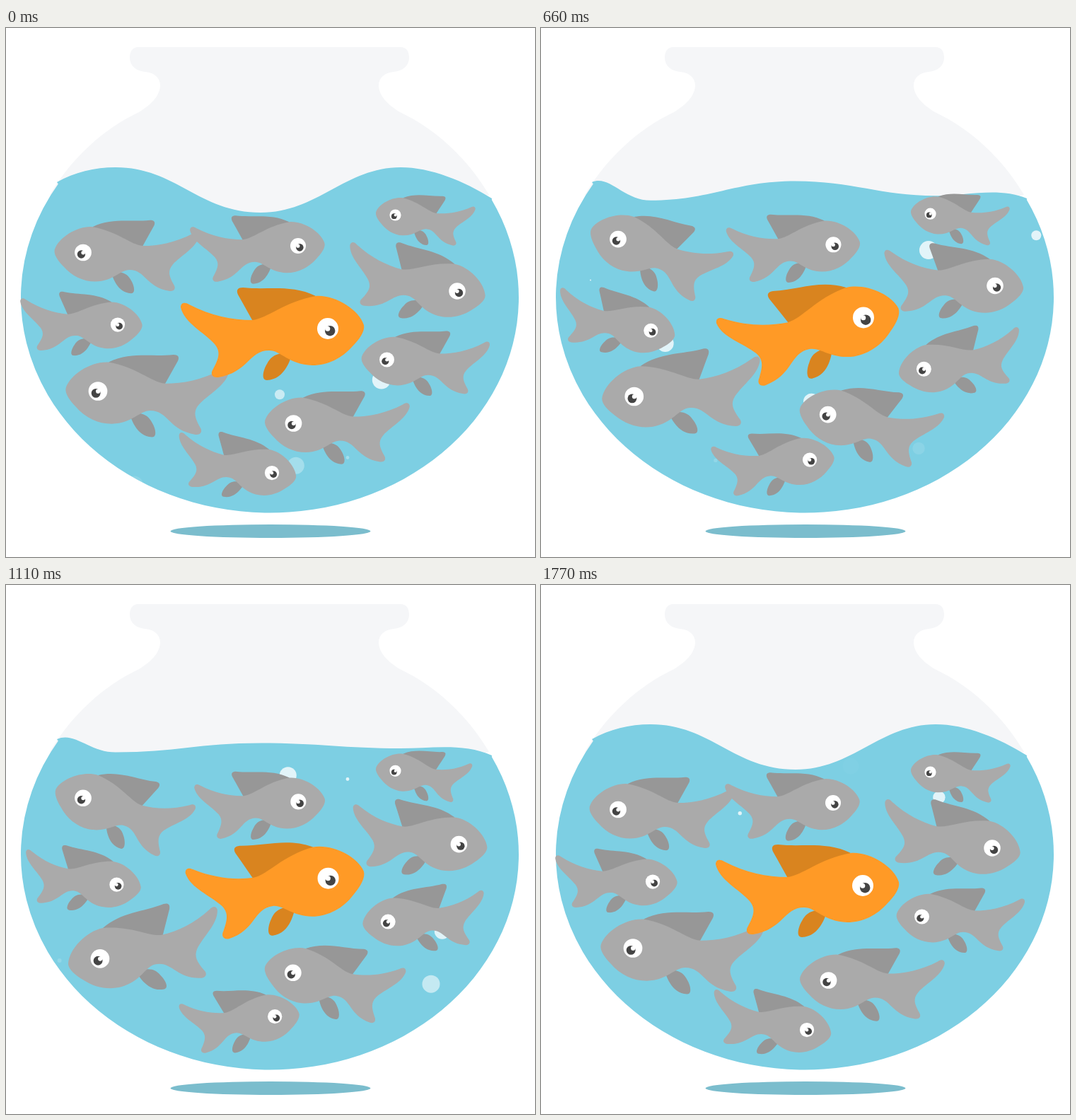
Recreate the animation shown at these times as an HTML page with a canvas. Size 748 px wide and 748 px high, loop 1.8 s.

```html
<!DOCTYPE html>
<html lang="en">
<head>
<meta charset="utf-8">
<title>Fish bowl</title>
<style>
html, body { margin: 0; width: 100%; height: 100%; overflow: hidden; background: #fff; }
canvas { display: block; width: 748px; height: 748px; }
</style>
</head>
<body>
<canvas id="stage" width="748" height="748"></canvas>
<script>
const ctx = document.getElementById('stage').getContext('2d');
const LOOP = 1800, STEP = 30, SWIM = 1770, TURN = 810;

const clamp = v => Math.min(1, Math.max(0, v));
const mix = (a, b, k) => a + (b - a) * k;
const ramp = (t, peak) => t < peak ? t / peak : (SWIM - t) / (SWIM - peak);

// Fish outlines: right-facing, eye at the origin; start point, then cubic segments.
const BODY = [-208, -30,
  -208, -37, -202, -38, -196, -34, -165, -18, -135, -12, -107, -12,
  -85, -14, -62, -38, -17, -46, 10, -48, 44, -27, 51, -5,
  53, 4, 44, 16, 35, 25, 20, 42, 0, 52, -22, 52,
  -55, 51, -66, 31, -83, 31, -112, 31, -112, 62, -155, 69,
  -163, 70, -167, 64, -162, 57, -154, 42, -151, 33, -160, 22,
  -175, 5, -203, -8, -208, -30];
const DORSAL = [-98, 4,
  -108, -14, -118, -32, -127, -48, -130, -55, -127, -58, -120, -58,
  -85, -54, -52, -63, -17, -46];
const VENTRAL = [-50, 34,
  -52, 41, -60, 72, -86, 73, -95, 73, -91, 58, -86, 50, -82, 42, -76, 36, -64, 35];

// Size (negative faces left), x, y, drift x, drift y, tilt, swing, time of the far point.
const school = [
  [-.79, 109, 317.5, 0, -20, 0, -19, 810],
  [.735, 413, 308, .5, 1, 0, 0, 810],
  [-.54, 550.5, 264.5, 0, 0, -4, 0, 810],
  [.785, 638, 372, 4.5, -5.5, 15, -6.5, 520],
  [.675, 158, 419.5, -3.5, 14, 5.4, 15, 300],
  [-.7, 538.5, 469, 3, 16.5, 0, 16, 600],
  [-.89, 130, 513.5, 3, 18, 0, 15.2, 1130],
  [-.79, 406.5, 559, -1, -12, 0, -10.5, 810],
  [.675, 376, 629, 5.5, -22, 14, -21, 900],
  [1, 455, 425, 1, -12.8, 0, -10, 600]
];

// Radius, birth time, x, y, then sideways and upward speed per second.
const bubbles = [
  [12, -45, 182, 659, -9, 302],
  [7, -230, 387, 585, 0, 290],
  [13, -300, 523, 581, 26, 278],
  [12, -115, 411, 655, -10, 315],
  [2.4, -115, 483, 642, 0, 300],
  [13.5, 0, 637, 629, -20, 385],
  [7, 0, 697, 523, 5, 348],
  [8.5, 290, 387, 727, -85, 363],
  [11.5, 330, 366, 609, 50, 245],
  [1, 100, 70, 533, 0, 315],
  [2.7, 600, 245, 627, 31, 260],
  [8.7, 620, 533, 605, 26, 265],
  [11, 820, 629, 607, -42, 404],
  [12.5, 900, 601, 623, 0, 280],
  [3, 1050, 75, 549, 10, 300]
];

// Swimming strokes shared by the school.
const KEYS = [0, 270, 480, TURN, 1110, 1350, SWIM];
const BOB = [0, .65, .92, 0, .37, 1];
const REACH = [1, .955, .97, 1, .96, .972];

// Smooth cyclic curve through the key values, without overshoot.
function curve(vals, t) {
  const n = vals.length;
  let i = 0;
  while (i < n - 1 && t >= KEYS[i + 1]) i++;
  const span = j => KEYS[(j + n) % n + 1] - KEYS[(j + n) % n];
  const slope = j => (vals[(j + 1) % n] - vals[(j + n) % n]) / span(j);
  const tangent = j => {
    const a = slope(j - 1), b = slope(j % n);
    return a * b <= 0 ? 0 : 2 * a * b / (a + b);
  };
  const h = span(i), k = clamp((t - KEYS[i]) / h), q = 1 - k;
  return vals[i] * q * q * (1 + 2 * k) + vals[(i + 1) % n] * k * k * (3 - 2 * k)
    + h * k * q * (q * tangent(i) - k * tangent(i + 1));
}

function shape(p, color) {
  ctx.beginPath();
  ctx.moveTo(p[0], p[1]);
  for (let i = 2; i < p.length; i += 6) ctx.bezierCurveTo(...p.slice(i, i + 6));
  ctx.fillStyle = color;
  ctx.fill();
}

function disc(x, y, r, color) {
  ctx.beginPath();
  ctx.arc(x, y, r, 0, Math.PI * 2);
  ctx.fillStyle = color;
  ctx.fill();
}

// Turns and shortens the rear of the body.
function bend(p, angle, reach) {
  const out = [];
  for (let i = 0; i < p.length; i += 2) {
    const w = clamp((-p[i] - 50) / 110);
    const a = angle * w, x = p[i] * mix(1, reach, w), y = p[i + 1];
    out.push(x * Math.cos(a) - y * Math.sin(a), x * Math.sin(a) + y * Math.cos(a));
  }
  return out;
}

function drawFish([size, x, y, dx, dy, tilt, swing, peak], t) {
  const rad = Math.PI / 180, k = ramp(t, peak), bob = curve(BOB, t);
  const turn = (tilt + swing * k) * rad, s = Math.abs(size);
  const [skin, fin] = s === 1 ? ['#ff9a26', '#d9841f'] : ['#aaaaaa', '#979797'];
  ctx.save();
  ctx.translate(x + dx * k, y + dy * k - 8.5 * s * bob);
  ctx.scale(size, s);
  ctx.rotate(turn);
  shape(DORSAL, fin);
  shape(VENTRAL, fin);
  shape(bend(BODY, -2.5 * bob * rad, curve(REACH, t)), skin);
  ctx.rotate(-turn);
  disc(0, 0, 15, '#fff');
  disc(3.2, 3.2, 7.2, '#444');
  disc(-.2, .2, 3.5, '#fff');
  ctx.restore();
}

function drawBubble([r, born, x, y, vx, vy], t) {
  const age = t - born, top = y - vy * age / 1000;
  ctx.globalAlpha = .78 * clamp(age / 300) * clamp((top - 256) / 8);
  disc(x + vx * age / 1000, top, r, '#fff');
  ctx.globalAlpha = 1;
}

// Left half of the glass; the right half mirrors it.
const GLASS = [187, 27,
  180, 27, 175, 32, 175, 42, 175, 53, 184, 61, 197, 62,
  210, 63, 218, 71, 218, 81, 218, 95, 206, 108, 188, 119,
  137, 143, 92, 185, 62, 236];

function drawGlass() {
  const path = new Path2D();
  path.moveTo(374, 27);
  path.lineTo(GLASS[0], GLASS[1]);
  for (let i = 2; i < GLASS.length; i += 6) path.bezierCurveTo(...GLASS.slice(i, i + 6));
  path.lineTo(374, 300);
  ctx.fillStyle = '#f5f6f8';
  ctx.fill(path);
  ctx.save();
  ctx.translate(745, 0);
  ctx.scale(-1, 1);
  ctx.fill(path);
  ctx.restore();
}

function fillWater(k) {
  const left = mix(197, 254.5, k), mid = mix(261, 206.5, k), right = mix(197, 246.5, k);
  ctx.beginPath();
  ctx.moveTo(72, 218);
  ctx.bezierCurveTo(97, mix(204, 208, k), mix(125, 115, k), left, 155, left);
  ctx.bezierCurveTo(240, left, 273, mid, 360, mid);
  ctx.bezierCurveTo(440, mid, 480, right, 558, right);
  ctx.bezierCurveTo(600, right, 647, mix(216, 226, k), 687, 241);
  ctx.ellipse(373, 381, 352, 304.5, 0, -.47, Math.PI + .555);
  ctx.fillStyle = '#7dcfe3';
  ctx.fill();
}

function draw(t) {
  ctx.fillStyle = '#fff';
  ctx.fillRect(0, 0, 748, 748);
  ctx.beginPath();
  ctx.ellipse(374, 711.5, 141.5, 9.5, 0, 0, Math.PI * 2);
  ctx.fillStyle = '#7bbdcd';
  ctx.fill();
  drawGlass();
  ctx.save();
  fillWater(ramp(t, TURN));
  ctx.clip();
  bubbles.forEach(b => drawBubble(b, t));
  ctx.restore();
  school.forEach(f => drawFish(f, t));
}

const start = performance.now();
function tick() {
  const t = Math.max(0, performance.now() - start) % LOOP;
  draw(Math.floor(t / STEP) * STEP);
  requestAnimationFrame(tick);
}
tick();
</script>
</body>
</html>
```
